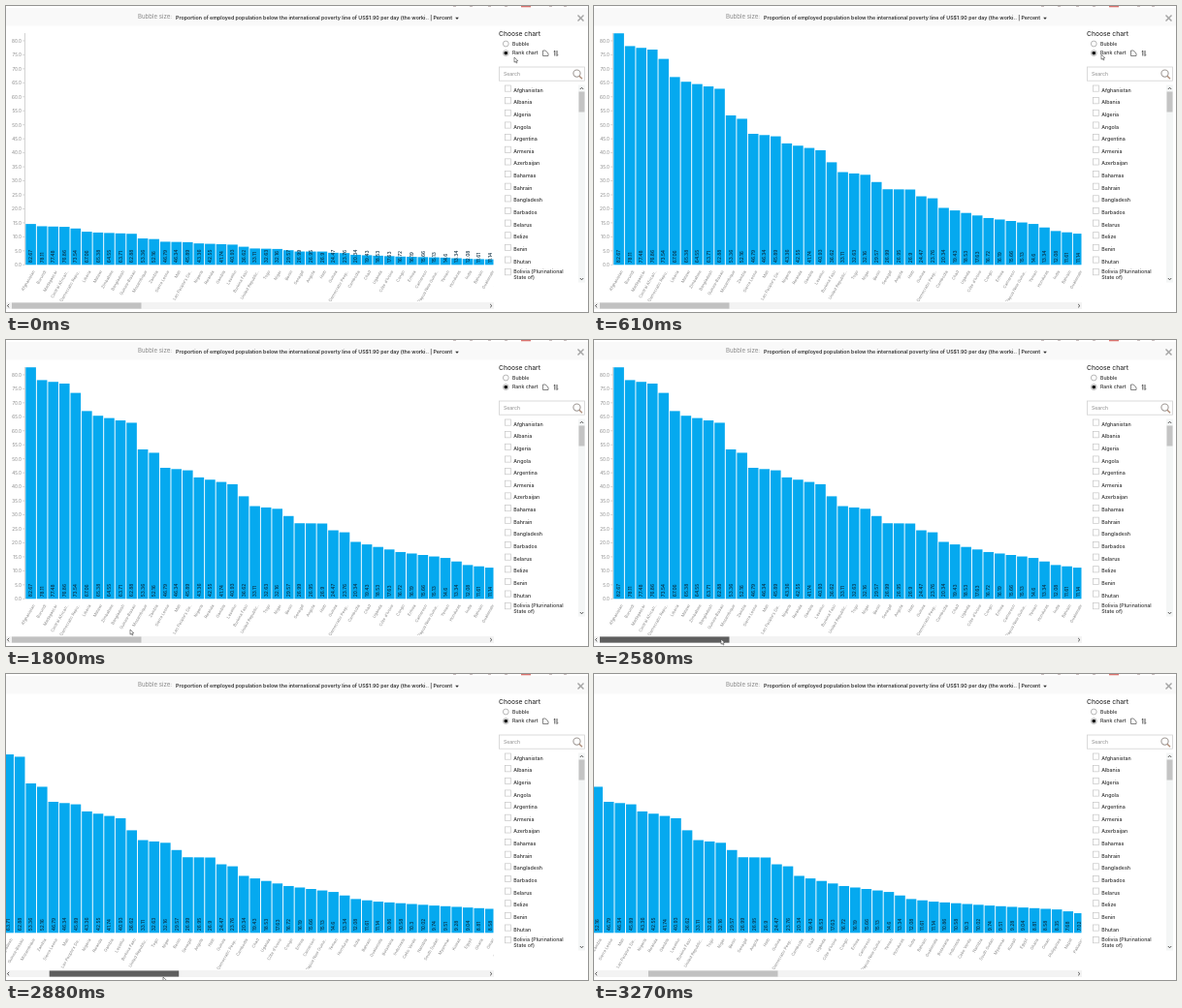
These frames come from a looping animation (600x316 px, 3340 ms). An HTML page with a canvas:

```html
<!DOCTYPE html>
<html lang="en">
<head>
<meta charset="utf-8">
<title>Rank chart</title>
<style>
html, body { margin: 0; width: 100%; height: 100%; overflow: hidden; background: #fff; }
canvas { display: block; width: 600px; height: 316px; }
</style>
</head>
<body>
<canvas id="stage"></canvas>
<script>
const W = 600, H = 316, LOOP = 3340, TICK = 77.8, LAST_TICK = 42;
const BASE = 267.3, UNIT = 2.892, PITCH = 11.55, FIRST = 25.6, BAR = 10.6;
const CHART_RIGHT = 503, SCROLL_RATIO = 2.98, THUMB_TRAVEL = 50;
const BLUE = '#05a9ef', INK = '#333', SOFT = '#858585';

const names = ('Afghanistan,Burundi,Madagascar,Central African..,Democratic Repu..,Liberia,' +
  'Malawi,Zimbabwe,Bangladesh,Guinea-Bissau,Mozambique,Zambia,Sierra Leone,Mali,' +
  "Lao People's De..,Nigeria,Rwanda,Gambia,Lesotho,Burkina Faso,United Republic..,Togo," +
  'Niger,Benin,Senegal,Angola,Haiti,Guinea,Democratic Peop..,Cambodia,Chad,Uganda,' +
  "Côte d'Ivoire,Congo,Eritrea,Cameroon,Papua New Guine..,Yemen,Honduras,India,Bahrain," +
  'Guatemala,Botswana,Indonesia,Cabo Verde,Namibia,South Sudan,Myanmar,Kuwait,Egypt,' +
  'Ghana,Oman,Philippines,Nepal,Pakistan').split(',');
const countries = ('Afghanistan,Albania,Algeria,Angola,Argentina,Armenia,Azerbaijan,Bahamas,' +
  'Bahrain,Bangladesh,Barbados,Belarus,Belize,Benin,Bhutan').split(',');

// Rank and value where the falling curve bends; ranks between are interpolated.
const bends = [
  [0, 82.67], [1, 78.11], [3, 76.86], [4, 73.54], [5, 67.06], [6, 65.38], [9, 62.88],
  [10, 53.36], [11, 52.16], [12, 46.79], [14, 45.89], [15, 43.36], [18, 40.93],
  [19, 36.62], [20, 33.11], [22, 32.16], [24, 26.99], [26, 26.9], [27, 24.47],
  [28, 23.76], [29, 20.34], [33, 16.72], [37, 14.6], [39, 12.08], [41, 11.14],
  [46, 9.74], [52, 8.35], [54, 7.02]
];
const values = names.map((_, rank) => valueAt(rank));

const canvas = document.getElementById('stage');
const ctx = canvas.getContext('2d');
const ratio = window.devicePixelRatio || 1;
canvas.width = W * ratio;
canvas.height = H * ratio;

function valueAt(rank) {
  const next = Math.max(1, bends.findIndex(([r]) => r >= rank));
  const [r0, v0] = bends[next - 1], [r1, v1] = bends[next];
  return +(v0 + (v1 - v0) * (rank - r0) / (r1 - r0)).toFixed(2);
}

function progress(tick, from, to) {
  return Math.min(1, Math.max(0, (tick - from) / (to - from)));
}

function cubicInOut(u) {
  return u < 0.5 ? 4 * u ** 3 : 1 - 4 * (1 - u) ** 3;
}

function smooth(u) {
  return u * u * (3 - 2 * u);
}

function arc(a, bend, b, u) {
  return a.map((v, i) => v * (1 - u) ** 2 + 2 * bend[i] * u * (1 - u) + b[i] * u * u);
}

function thumbShift(tick) {
  return THUMB_TRAVEL * (1 - (1 - progress(tick, 33.5, 39.5)) ** 1.7);
}

function pointerAt(tick) {
  const menu = [523, 50], chart = [478, 253], labels = [128, 299], thumb = [131, 309];
  if (tick < 9) return [524 - tick / 8, 53 - 3 * smooth(progress(tick, 4, 8))];
  if (tick < 16) return arc(menu, [568, 120], chart, smooth(progress(tick, 9, 16)));
  if (tick < 23) return arc(chart, [300, 292], labels, smooth(progress(tick, 16, 23)));
  if (tick < 33) return arc(labels, [115, 303], thumb, progress(tick, 23, 28));
  return [thumb[0] + thumbShift(tick) * 0.8, thumb[1] + 8 * progress(tick, 33, 41)];
}

function rect(x, y, w, h, color) {
  ctx.fillStyle = color;
  ctx.fillRect(x, y, w, h);
}

function box(x, y, w, h, color, width = 0.8) {
  ctx.strokeStyle = color;
  ctx.lineWidth = width;
  ctx.strokeRect(x, y, w, h);
}

function trace(points) {
  ctx.beginPath();
  points.forEach(([x, y]) => ctx.lineTo(x, y));
}

function line(points, color, width) {
  trace(points);
  ctx.strokeStyle = color;
  ctx.lineWidth = width;
  ctx.stroke();
}

function shape(points, fill) {
  trace(points);
  ctx.closePath();
  ctx.fillStyle = fill;
  ctx.fill();
}

function circle(x, y, r, color, width) {
  ctx.beginPath();
  ctx.arc(x, y, r, 0, Math.PI * 2);
  ctx.strokeStyle = ctx.fillStyle = color;
  ctx.lineWidth = width || 1;
  if (width) ctx.stroke();
  else ctx.fill();
}

function arrow(x, y, turn) {
  ctx.save();
  ctx.translate(x, y);
  ctx.rotate(turn * Math.PI / 2);
  line([[-1.7, 0.9], [0, -0.9], [1.7, 0.9]], '#444', 0.9);
  ctx.restore();
}

function text(str, x, y, size, color, { weight = 400, align = 'left', turn = 0 } = {}) {
  ctx.save();
  ctx.translate(x, y);
  ctx.rotate(turn * Math.PI / 180);
  ctx.font = `${weight} ${size}px Inter, sans-serif`;
  ctx.textAlign = align;
  ctx.textBaseline = 'middle';
  ctx.fillStyle = color;
  ctx.fillText(str, 0, 0);
  ctx.restore();
}

function drawHeader() {
  rect(0, 2, W, 18.5, '#f9f9f9');
  for (const x of [461, 478, 497, 514, 560, 575]) rect(x, 0, 3, 0.7, '#b5a5a5');
  rect(531, 0, 10, 1.3, '#d9736f');
  text('Bubble size:', 136, 11.4, 6.1, '#888');
  text('Proportion of employed population below the international poverty line of US$1.90 per day (the worki.. | Percent',
    175, 12.7, 5.3, INK, { weight: 600 });
  shape([[463.2, 11.8], [466.8, 11.8], [465, 14]], INK);
  line([[589.5, 9.5], [595.5, 15.5]], '#a5a5a5', 1.5);
  line([[595.5, 9.5], [589.5, 15.5]], '#a5a5a5', 1.5);
}

function drawAxis() {
  line([[19.5, 28], [19.5, BASE]], '#c8c8c8', 0.8);
  for (let v = 0; v <= 80; v += 5) {
    const y = BASE - v * UNIT;
    line([[17, y], [19.5, y]], '#c8c8c8', 0.7);
    text(v.toFixed(1), 16, y + 0.4, 4.7, SOFT, { align: 'right' });
  }
}

function drawChart(grow, scroll) {
  ctx.save();
  ctx.beginPath();
  ctx.rect(0, 21, CHART_RIGHT - 0.5, 284);
  ctx.clip();
  ctx.translate(-scroll, 0);
  drawAxis();
  values.forEach((v, i) => {
    const x = FIRST + i * PITCH, h = v * UNIT * grow;
    rect(x - BAR / 2, BASE - h, BAR, h, BLUE);
    text(v, x + 0.2, 265.2, 4.9, '#0b2c3f', { weight: 500, turn: -90 });
    text(names[i], x + 3.2, 273.5, 4.2, SOFT, { align: 'right', turn: -60 });
  });
  ctx.restore();
}

function drawScrollbar(shift, dragging) {
  rect(0, 306, CHART_RIGHT, 7, '#f3f3f3');
  arrow(2.3, 309.6, -1);
  arrow(500, 309.6, 1);
  rect(6 + shift, 306.4, 133.5, 6.2, dragging ? '#5e5e5e' : '#c1c1c1');
}

function drawOptions() {
  text('Choose chart', 508, 28.8, 6.7, INK, { weight: 500 });
  circle(515.3, 39, 2.9, '#999', 0.7);
  text('Bubble', 522, 39.2, 5.2, INK, { weight: 500 });
  circle(515.3, 48.6, 2.9, '#999', 0.7);
  circle(515.3, 48.6, 1.9, '#111');
  text('Rank chart', 522, 48.8, 5.2, INK, { weight: 500 });
  line([[553.5, 46], [556.3, 46], [559, 49], [559, 51.5], [553.5, 51.5], [553.5, 46]], '#666', 0.8);
  line([[565.8, 51.5], [565.8, 46], [564.8, 47.2]], '#444', 0.9);
  line([[568, 46], [568, 51.5], [569, 50.3]], '#444', 0.9);

  box(508.5, 63, 88, 14.2, '#d2d2d2');
  text('Search', 513, 70.3, 5.1, '#888');
  circle(588.5, 69.6, 3.6, '#a09a96', 1.1);
  line([[591, 72.3], [594, 75.3]], '#b08f7c', 1.4);
}

function drawCountry(name, y) {
  text(name, 523.2, y, 5.3, INK, { weight: 500 });
}

function drawCountries() {
  const step = 12.64;
  for (let i = 0; i <= countries.length; i++) box(514.4, 82 + i * step, 6.2, 6.2, '#c6c6c6', 0.7);
  countries.forEach((name, i) => drawCountry(name, 87 + i * step));
  drawCountry('Bolivia (Plurinational', 274.3);
  drawCountry('State of)', 280);

  rect(590, 81.5, 7, 204, '#f4f6f6');
  rect(590.5, 88.5, 6, 21, '#c4c4c4');
  arrow(593.5, 85.1, 0);
  arrow(593.5, 281.9, 2);
}

function drawPointer([x, y]) {
  const tip = [[0, 0], [0, 5.2], [1.2, 4.1], [2.2, 6], [3, 5.6], [2.2, 3.8], [3.8, 3.6]];
  const points = tip.map(([dx, dy]) => [x + dx, y + dy]);
  shape(points, '#fff');
  line([...points, points[0]], '#444', 0.6);
}

function render(now) {
  const tick = Math.min(LAST_TICK, Math.floor((now % LOOP + 14) / TICK));
  const grow = cubicInOut(progress(tick * TICK, -265, 485));
  const shift = thumbShift(tick);

  ctx.setTransform(ratio, 0, 0, ratio, 0, 0);
  rect(0, 0, W, H, '#fff');
  drawHeader();
  drawChart(grow, shift * SCROLL_RATIO);
  drawScrollbar(shift, tick >= 29 && tick < LAST_TICK);
  drawOptions();
  drawCountries();
  if (tick < LAST_TICK) drawPointer(pointerAt(tick));
}

function loop() {
  render(performance.now());
  requestAnimationFrame(loop);
}
loop();
</script>
</body>
</html>
```
